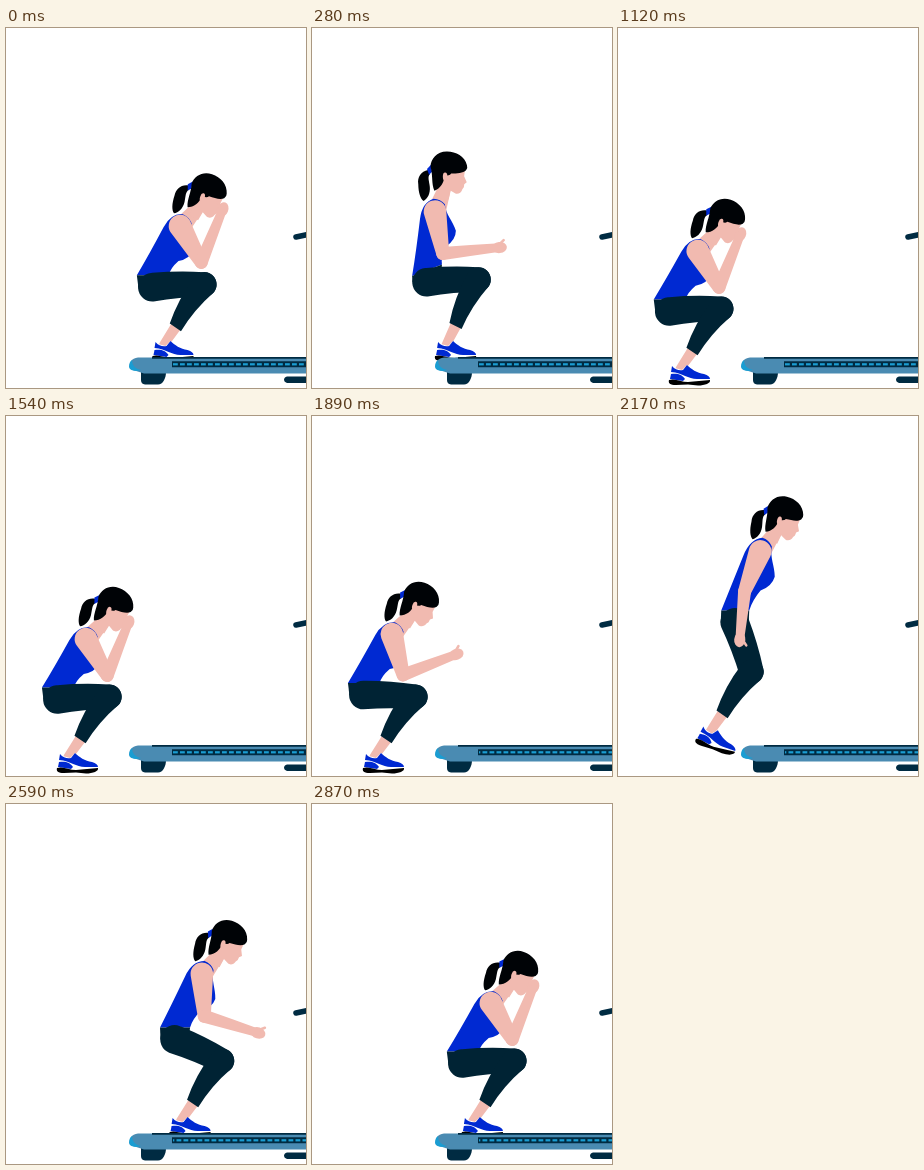
Recreate the animation shown at these times as an HTML page with a canvas. Size 300 by 360 pixels, loop 2940 ms.

```html
<!DOCTYPE html>
<html lang="en">
<head>
<meta charset="utf-8">
<title>Treadmill squat jump</title>
<style>
html, body { margin: 0; width: 100%; height: 100%; overflow: hidden; background: #fff; }
canvas { display: block; width: 300px; height: 360px; }
</style>
</head>
<body>
<canvas id="stage"></canvas>
<script>
const LOOP = 2940, STEP = 70;
const BELT = 317, FLOOR = 341;
const SKIN = '#f1bab0', BLUE = '#0029d2', PANTS = '#002334', HAIR = '#000306';
const STEEL = '#4a8bb2', NAVY = '#002b42', CYAN = '#1a9dd2';
const canvas = document.getElementById('stage');
const ctx = canvas.getContext('2d');
const ratio = window.devicePixelRatio || 1;
canvas.width = 300 * ratio;
canvas.height = 360 * ratio;

const clamp = v => Math.max(0, Math.min(1, v));
const lerp = (a, b, u) => a + (b - a) * u;
const phase = (t, from, to) => clamp((t - from) / (to - from));
const smooth = u => u * u * (3 - 2 * u);
const bump = (t, from, peak, to) => smooth(phase(t, from, peak)) * (1 - smooth(phase(t, peak, to)));
const bell = (t, mid, width) => Math.exp(-(((t - mid) / width) ** 2));
const arch = (a, b, height, u) => lerp(a, b, u) - height * 4 * u * (1 - u);
// Unit vector, in degrees from straight down
const dir = deg => [Math.sin(deg * Math.PI / 180), Math.cos(deg * Math.PI / 180)];
const add = (p, d, k = 1) => [p[0] + d[0] * k, p[1] + d[1] * k];

// Ride the belt, hop back to the floor, wait, hop onto the belt again
function anklePosition(t) {
  if (t < 520) return [lerp(157.5, 114, t / 520), BELT];
  if (t < 900) {
    const u = phase(t, 520, 900);
    return [lerp(114, 62, u ** 3), arch(BELT, FLOOR, 24, u)];
  }
  if (t < 2520) {
    const u = phase(t, 2100, 2520);
    return [lerp(62, 178, Math.sin(u * Math.PI / 2)), arch(FLOOR, BELT, 38, u)];
  }
  return [lerp(178, 157.5, phase(t, 2520, LOOP)), BELT];
}

function poseAt(t) {
  const thigh = 93 - 56 * bump(t, 280, 570, 1120) - 97 * bump(t, 1820, 2330, 2730);
  const squat = clamp((thigh - 40) / 50);
  const curl = 1 - bump(t, 100, 580, 1120) - bump(t, 1680, 2340, 2800);
  return {
    thigh, squat,
    shin: -34.5 + 17 * bell(t, 520, 280),
    lean: 22 + 7 * squat - 30 * bell(t, 400, 220),
    upper: lerp(-30, 31, curl),
    fore: lerp(-38, 158, curl),
    toe: 27 * bell(t, 680, 120) + 25 * bell(t, 2230, 110)
  };
}

function fill(color, path) {
  ctx.fillStyle = color;
  path ? ctx.fill(new Path2D(path)) : ctx.fill();
}

function line(color, width, path) {
  ctx.strokeStyle = color;
  ctx.lineWidth = width;
  ctx.lineCap = 'round';
  ctx.stroke(new Path2D(path));
}

function oval(color, x, y, rx, ry) {
  ctx.beginPath();
  ctx.ellipse(x, y, rx, ry, 0, 0, 2 * Math.PI);
  fill(color);
}

// Tapered limb between two circles; bow bends it sideways, flat cuts the far end
function limb(color, a, ra, b, rb, { bow = 0, flat = false } = {}) {
  const dx = b[0] - a[0], dy = b[1] - a[1];
  const ang = Math.atan2(dy, dx), off = Math.acos((ra - rb) / Math.hypot(dx, dy));
  const rim = (c, r, s) => [c[0] + r * Math.cos(ang + s * off), c[1] + r * Math.sin(ang + s * off)];
  const normal = [-Math.sin(ang), Math.cos(ang)];
  const bend = s => {
    const p = rim(a, ra, s), q = rim(b, rb, s);
    return add([(p[0] + q[0]) / 2, (p[1] + q[1]) / 2], normal, bow);
  };
  ctx.beginPath();
  ctx.arc(...a, ra, ang + off, ang - off + 2 * Math.PI);
  ctx.quadraticCurveTo(...bend(-1), ...rim(b, rb, -1));
  if (flat) ctx.lineTo(...rim(b, rb, 1));
  else ctx.arc(...b, rb, ang - off, ang + off);
  ctx.quadraticCurveTo(...bend(1), ...rim(a, ra, 1));
  fill(color);
}

function placed(p, deg, draw) {
  ctx.save();
  ctx.translate(...p);
  ctx.rotate(deg * Math.PI / 180);
  draw();
  ctx.restore();
}

function drawShoe() {
  fill('#fff', 'M-9 -2 L-11 12 L30 12 C30 8 24 6 18 4 L7 -4 L2 1Z');
  fill(BLUE, 'M-8 -3 C-5 1 0 2 3 1 L7 -4 C11 0 17 4 24 5 C28 6 30 8 30 10 L17 10 C8 10 3 4 -9 3Z');
  fill(BLUE, 'M-9 5 C-3 4 2 5 5 10 L3 12 L-10 10Z');
  fill('#000', 'M-11 11 C-5 9 1 13 8 13 L30 11 C31 14 25 16.5 18 16.5 L8 15.5 L-4 16 C-10 16 -12 14 -11 11Z');
}

function drawHead() {
  fill(SKIN, 'M-5 4 L17 2 L16 9 L18.5 15 L16 17 L15.5 20 L14 22 C13 26 9 27 7 26 L2 23 L0 32 L-11 30 L-7 18Z');
  fill(HAIR, 'M-20 2 C-27 3 -31 9 -30 16 C-30 25 -28 31 -25 33 C-21 31 -18 26 -18.5 19 C-19 13 -21 9 -18 6Z');
  fill(BLUE, 'M-21 1 L-17 -3 L-16 4 L-19 7Z');
  fill(HAIR, 'M19 -2 C17 -11 8 -16 -1 -16 C-11 -16 -17 -9 -17.5 -1 C-15 8 -17 16 -14 23 C-8 21 -4 15 -4 9 C-2 7 1 9 3 6 C9 6 15 6 18 3 Q20 1 19 -2Z');
  oval(SKIN, -3, 9, 2.3, 4.2);
}

function drawWoman(t) {
  const { thigh, squat, shin, lean, upper, fore, toe } = poseAt(t);
  const ankle = anklePosition(t);
  const knee = add(ankle, dir(shin), -73);
  const hip = add(knee, dir(thigh), -52);
  const cuff = add(knee, dir(shin), 51);
  const waist = add(hip, [0.5, -12]);
  const up = dir(180 - lean), front = [-up[1], up[0]];
  const length = 63 - 7 * squat + (29 - lean) * 0.15;
  const shoulder = add(waist, up, length);
  const head = add(shoulder, dir(180 - lean - 11), 46);
  const elbow = add(shoulder, dir(upper), 43);
  const hand = add(elbow, dir(fore), 48 + 9 * clamp((fore + 10) / 90));
  const tilt = dir(90 + 1.6 * Math.max(0, 20 - lean) * squat);
  const half = 14 + 2 * squat;
  const back = add(waist, tilt, -half), belly = add(waist, tilt, half);
  const at = (down, out) => add(add(shoulder, up, -down * length / 64), front, out);

  limb(SKIN, cuff, 5.5, ankle, 4.5);
  placed(ankle, toe, drawShoe);

  limb(SKIN, at(-3, 3), 9, add(head, dir(-lean), 17), 6);
  placed(head, lean * 0.9 - 7, drawHead);

  ctx.beginPath();
  ctx.moveTo(...back);
  ctx.quadraticCurveTo(...at(45, -13), ...at(10, -13));
  ctx.quadraticCurveTo(...at(-8, -13), ...at(-13.5, -2));
  ctx.quadraticCurveTo(...at(-14, 5), ...at(-9, 10));
  ctx.bezierCurveTo(...at(2, 12), ...at(8, 20), ...at(18, 24));
  ctx.quadraticCurveTo(...at(28, 25), ...at(36, 16));
  ctx.quadraticCurveTo(...at(48, 12), ...belly);
  fill(BLUE);

  ctx.beginPath();
  [back, belly, add(hip, [14, 0]), add(hip, [-14, 0])].forEach(p => ctx.lineTo(...p));
  fill(PANTS);
  limb(PANTS, hip, 14.3, knee, 12.3, { bow: -2 });
  limb(PANTS, knee, 12.3, cuff, 6.8, { bow: 4, flat: true });

  limb(SKIN, add(shoulder, front, 1), 11.3, elbow, 6.5);
  limb(SKIN, elbow, 6.5, hand, 4.3);
  placed(hand, 90 - fore, () => {
    oval(SKIN, 0, 0, 7.5, 5.6);
    line(SKIN, 2.6, 'M0 -3 L5 -7');
  });
}

function drawTreadmill(t) {
  line(NAVY, 5.6, 'M290 209 L304 206');
  fill(NAVY, 'M135 344 H160 C160 350 157 356.5 152 356.5 H139 Q135 356 135 352Z');
  fill(NAVY, 'M281 348.5 H300 V355 H281 Q278 354 278 352 Q278 349 281 348.5Z');
  fill(STEEL, 'M132 329.5 H300 V345.5 H138 L124 341 Q122 331 132 329.5Z');
  fill(CYAN, 'M126 332 Q123 334 123 339 Q124 343 131 343 L135 342 Q126 340 126 332Z');
  fill(NAVY, 'M146 329 H300 V330.7 H146Z');
  fill(NAVY, 'M166 333.2 H300 V339.3 H166Z');
  ctx.save();
  ctx.beginPath();
  ctx.rect(167, 334, 133, 5);
  ctx.clip();
  ctx.fillStyle = CYAN;
  const shift = t / STEP * 3.5 % 7;
  for (let x = 167 - shift; x < 300; x += 7) ctx.fillRect(x, 335.2, 4.8, 2.2);
  ctx.restore();
}

function render(now) {
  const t = Math.floor(now % LOOP / STEP) * STEP;
  ctx.setTransform(ratio, 0, 0, ratio, 0, 0);
  ctx.fillStyle = '#fff';
  ctx.fillRect(0, 0, 300, 360);
  drawWoman(t);
  drawTreadmill(t);
}

const start = performance.now();
function tick() {
  render(performance.now() - start);
  requestAnimationFrame(tick);
}
tick();
</script>
</body>
</html>
```
